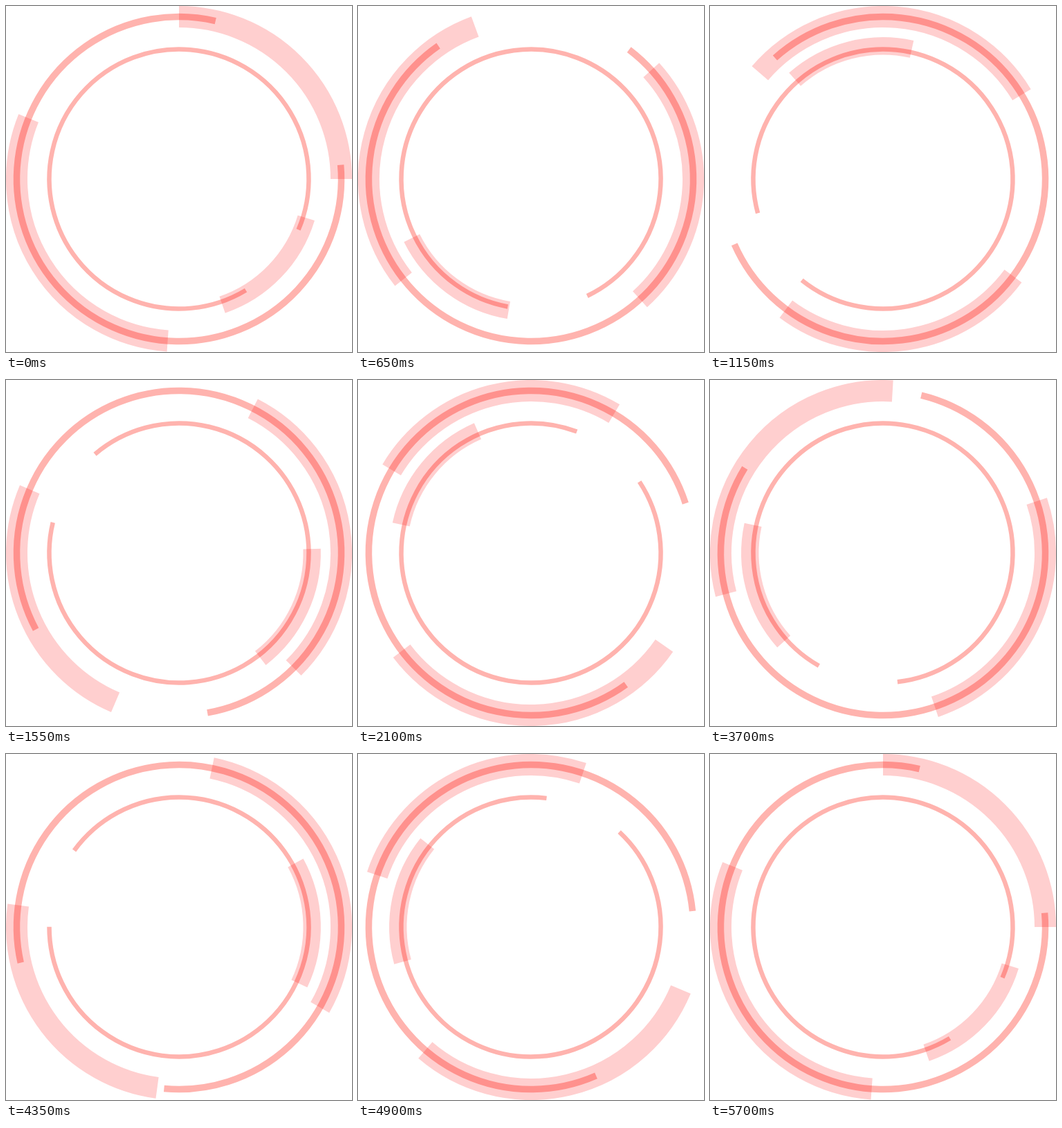
Write an HTML page that moves like this. It is 500 by 500 pixels and loops after 5750 ms.

```html
<!DOCTYPE html>
<html lang="en">
<head>
<meta charset="utf-8">
<title>Rotating rings</title>
<style>
  html, body { margin: 0; width: 100%; height: 100%; overflow: hidden; background: #fff; }
  svg { display: block; width: 100%; height: 100%; }
  path { fill: none; mix-blend-mode: multiply; }
</style>
</head>
<body>
<svg id="stage" viewBox="0 0 500 500"></svg>
<script>
const LOOP = 5750;
const TICK = 50;
const STEP = 80;
const HALF_STEPS = 36;
const PALE = '#ffcfcf';
const STRONG = '#ffb3ae';

// Cubic easing with flat ends; x1 and x2 are the handle positions in time.
function ease(x, x1, x2) {
  let low = 0, high = 1;
  for (let i = 0; i < 40; i++) {
    const u = (low + high) / 2, v = 1 - u;
    const time = 3 * x1 * u * v * v + 3 * x2 * u * u * v + u * u * u;
    if (time < x) low = u; else high = u;
  }
  return low * low * (3 - 2 * low);
}

const even = x => ease(x, 1 / 3, 2 / 3);
const late = x => ease(x, 1 / 3, 5 / 6);

// Angles are in degrees, clockwise from the top.
const arcs = [
  { radius: 234.5, width: 31, color: PALE, start: 0, span: 90, turns: 1, easing: even },
  { radius: 234.5, width: 31, color: PALE, start: 184, span: 108, turns: 1, easing: even },
  { radius: 192.2, width: 25.4, color: PALE, start: 107, span: 54, turns: 2, easing: late },
  { radius: 234.5, width: 9.5, color: STRONG, start: 85, span: 288, turns: -1, easing: even },
  { radius: 187.5, width: 6.5, color: STRONG, start: 149, span: 324, turns: 1, easing: late }
];

function arcPath(radius, span) {
  const angle = span * Math.PI / 180;
  const x = 250 + radius * Math.sin(angle);
  const y = 250 - radius * Math.cos(angle);
  return `M250 ${250 - radius}A${radius} ${radius} 0 ${span > 180 ? 1 : 0} 1 ${x} ${y}`;
}

const stage = document.getElementById('stage');
for (const arc of arcs) {
  arc.node = document.createElementNS('http://www.w3.org/2000/svg', 'path');
  arc.node.setAttribute('d', arcPath(arc.radius, arc.span));
  arc.node.setAttribute('stroke', arc.color);
  arc.node.setAttribute('stroke-width', arc.width);
  stage.append(arc.node);
}

function render(ms) {
  const time = Math.floor((ms % LOOP + 0.5) / TICK) * TICK;
  const step = Math.floor(time / STEP) % HALF_STEPS;
  const progress = step / (HALF_STEPS - 1);
  for (const { node, start, turns, easing } of arcs) {
    const angle = start + 360 * turns * easing(progress);
    node.setAttribute('transform', `rotate(${angle} 250 250)`);
  }
}

let origin = null;
function loop(now) {
  origin ??= now;
  render(now - origin);
  requestAnimationFrame(loop);
}

render(0);
requestAnimationFrame(loop);
</script>
</body>
</html>
```
